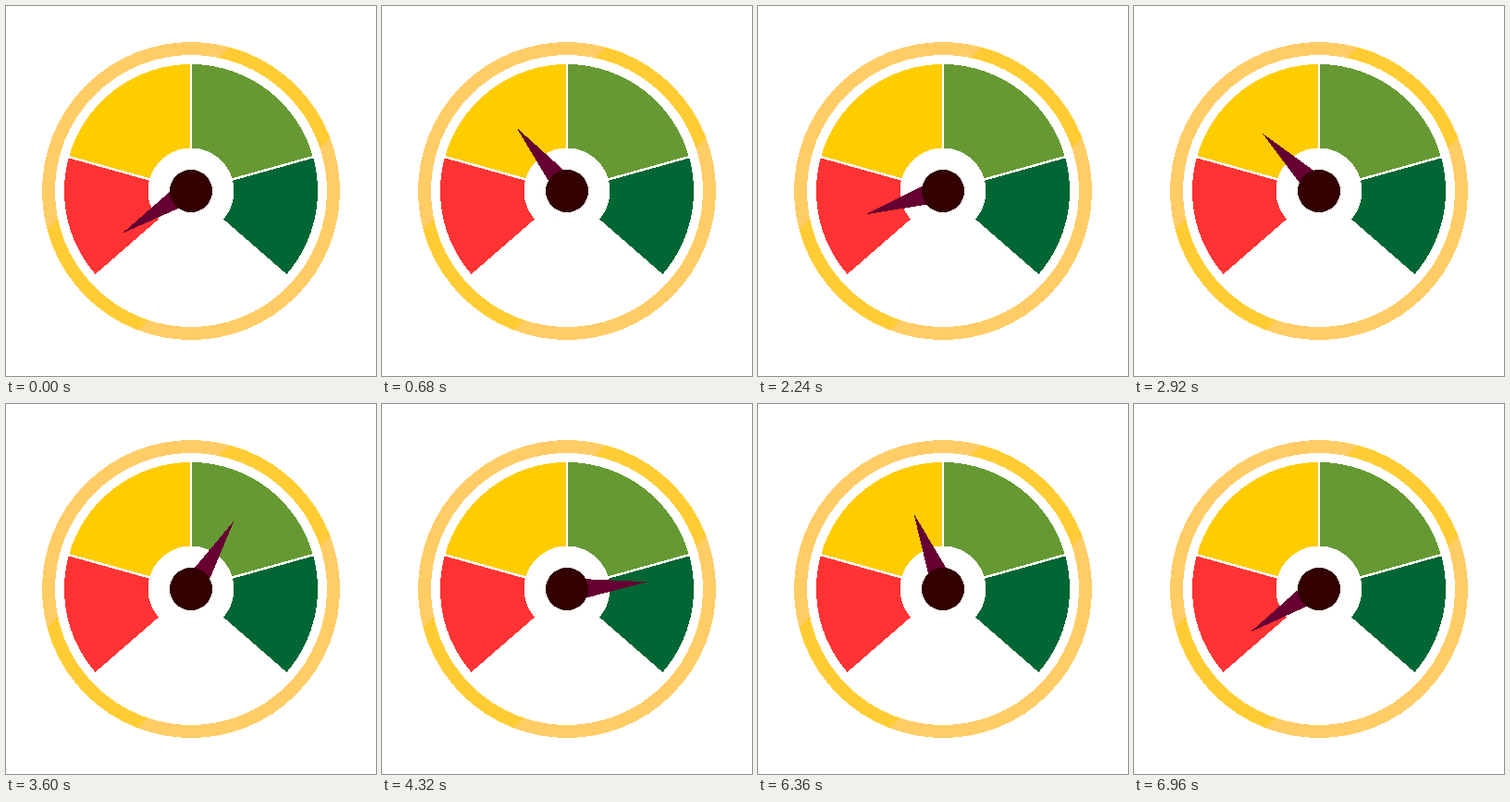
These frames come from a looping animation (400 px wide and 400 px high, 7000 ms). An HTML page:

```html
<!DOCTYPE html>
<html lang="en">
<head>
<meta charset="utf-8">
<title>Gauge</title>
<style>
  html, body { margin: 0; width: 100%; height: 100%; overflow: hidden; background: #fff; }
  svg { display: block; width: 100vw; height: 100vh; }
</style>
</head>
<body>
<svg viewBox="0 0 400 400" shape-rendering="crispEdges">
  <defs>
    <clipPath id="band"><path d="M286 0H493L93 400H-114Z"/></clipPath>
  </defs>
  <g fill="none" stroke-width="14">
    <circle cx="200" cy="200" r="154" stroke="#ffcc66"/>
    <circle cx="200" cy="200" r="154" stroke="#ffcc33" clip-path="url(#band)"/>
  </g>
  <g transform="translate(200 200)">
    <g id="sectors"></g>
    <g id="gaps" stroke="#fff" stroke-width="2.5"></g>
    <circle r="46.5" fill="#fff"/>
    <path id="needle" d="M0 -87.5L13 -10H-10.4Z" fill="#660033"/>
    <circle r="23" fill="#330000"/>
  </g>
</svg>
<script>
  const LOOP = 7000;
  const RADIUS = 137;
  const byId = id => document.getElementById(id);

  // Angles are degrees clockwise from straight up.
  const sectors = [
    [-131, -74.4, '#ff3333'],
    [-74.4, 0, '#ffcc00'],
    [0, 74.4, '#669933'],
    [74.4, 131, '#006633']
  ];

  // Needle poses: [time in ms, angle]
  const poses = [
    [0, -121.7], [1400, 51.3], [2300, -110.8], [3610, 32.5],
    [4340, 85.3], [5750, 85.3], [6950, -122.2], [LOOP, -121.7]
  ];

  function rim(angle) {
    const a = angle * Math.PI / 180;
    return `${RADIUS * Math.sin(a)} ${-RADIUS * Math.cos(a)}`;
  }

  byId('sectors').innerHTML = sectors.map(([from, to, color]) =>
    `<path fill="${color}" d="M0 0L${rim(from)}A${RADIUS} ${RADIUS} 0 0 1 ${rim(to)}Z"/>`
  ).join('');

  byId('gaps').innerHTML = sectors.slice(1).map(([from]) =>
    `<path d="M0 0L${rim(from)}"/>`
  ).join('');

  // Soft start and stop around a nearly even sweep
  function ease(u) {
    return 0.25 * u + 0.75 * (1 - Math.cos(Math.PI * u)) / 2;
  }

  function needleAngle(t) {
    const next = poses.findIndex(([time]) => time > t);
    const [t0, a0] = poses[next - 1];
    const [t1, a1] = poses[next];
    return a0 + (a1 - a0) * ease((t - t0) / (t1 - t0));
  }

  function draw(t) {
    byId('needle').setAttribute('transform', `rotate(${needleAngle(t)})`);
  }

  const start = performance.now();
  function tick() {
    draw((performance.now() - start) % LOOP);
    requestAnimationFrame(tick);
  }
  tick();
</script>
</body>
</html>
```
